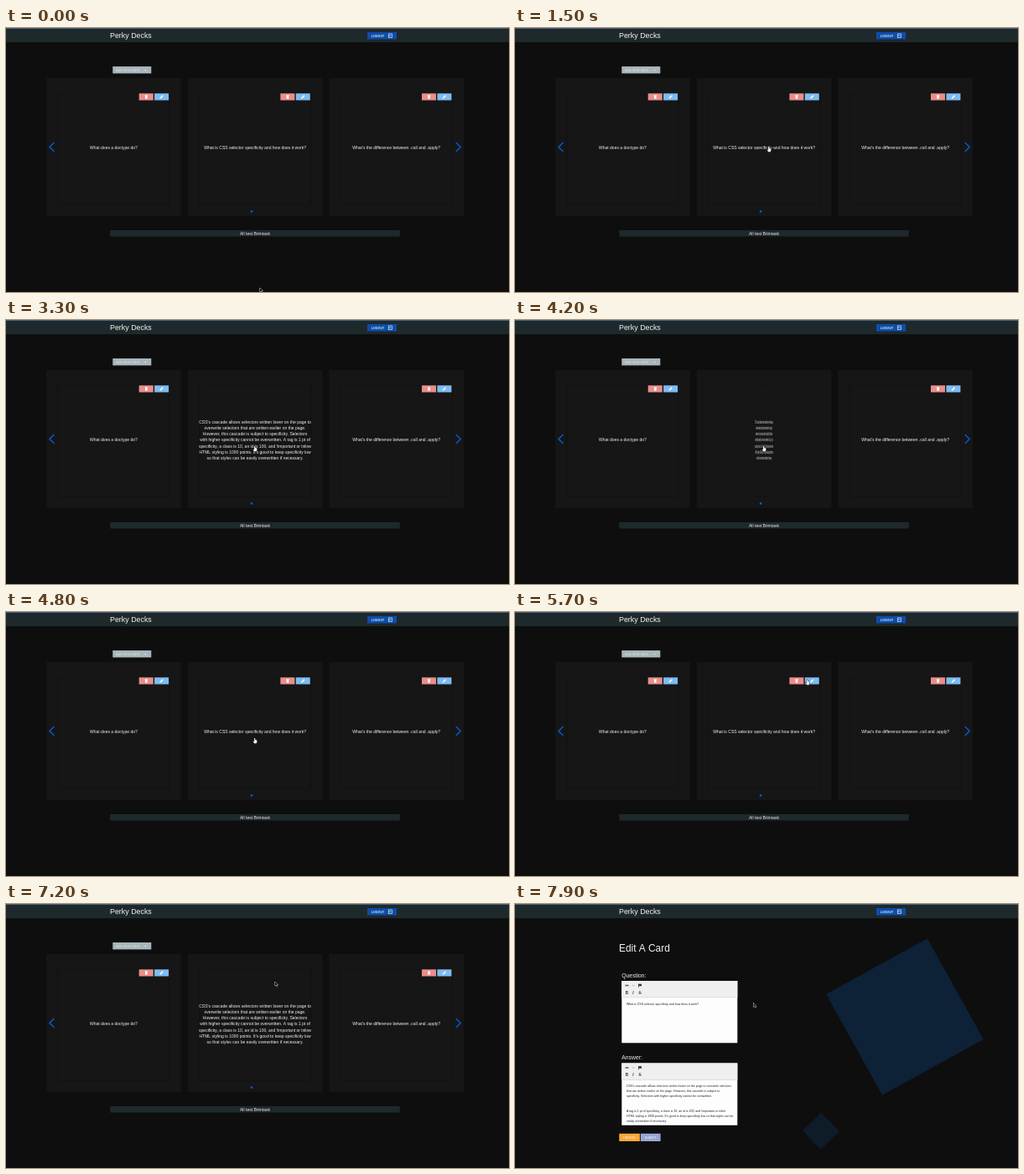
Write an HTML page with a canvas that moves like this. It is 600 px wide and 316 px high and loops after 8 s.

```html
<!DOCTYPE html>
<html lang="en">
<head>
<meta charset="utf-8">
<title>Flashcards</title>
<style>
  html, body { margin: 0; width: 100%; height: 100%; overflow: hidden; background: #0e0e0e; }
  canvas { display: block; width: 600px; height: 316px; }
</style>
</head>
<body>
<canvas id="stage" width="600" height="316"></canvas>
<script>
const ctx = document.getElementById('stage').getContext('2d');
const LOOP = 8000, EDIT_AT = 7350, FLIP_MS = 600;
const FLIPS = [2000, 4040, 6400];
const QUESTIONS = [
  'What does a doctype do?',
  'What is CSS selector specificity and how does it work?',
  "What's the difference between .call and .apply?"
];
const ANSWER = [
  "CSS's cascade allows selectors written lower on the page to",
  'overwrite selectors that are written earlier on the page.',
  'However, this cascade is subject to specificity. Selectors',
  'with higher specificity cannot be overwritten. A tag is 1 pt of',
  'specificity, a class is 10, an id is 100, and !important or inline',
  "HTML styling is 1000 points. It's good to keep specificity low",
  'so that styles can be easily overwritten if necessary.'
];
const EDIT_ANSWER = [
  "CSS's cascade allows selectors written lower on the page to overwrite selectors",
  'that are written earlier on the page. However, this cascade is subject to',
  'specificity. Selectors with higher specificity cannot be overwritten.',
  '', '',
  'A tag is 1 pt of specificity, a class is 10, an id is 100, and !important or inline',
  "HTML styling is 1000 points. It's good to keep specificity low so that styles can be",
  'easily overwritten if necessary.'
];
// time, x, y of the pointer tip
const POINTER = [
  [0, 303, 311], [100, 303, 311], [400, 306, 139], [800, 306, 139], [1400, 303, 142],
  [1800, 303, 142], [1980, 297, 151], [4850, 297, 151], [5500, 349, 81], [5700, 349, 81],
  [6100, 352, 80], [6600, 352, 80], [7100, 321, 93], [7250, 321, 93], [7850, 284.5, 118.5]
];

const clamp = v => Math.max(0, Math.min(1, v));
const smooth = v => v * v * (3 - 2 * v);

// CSS "ease": cubic-bezier(.25, .1, .25, 1)
function ease(x) {
  let lo = 0, hi = 1, u = x;
  for (let i = 0; i < 20; i++) {
    u = (lo + hi) / 2;
    const bx = .75 * u * (1 - u) + u ** 3;
    if (bx < x) lo = u; else hi = u;
  }
  return .3 * u * (1 - u) ** 2 + 3 * u * u * (1 - u) + u ** 3;
}

function rect(x, y, w, h, color) {
  ctx.fillStyle = color;
  ctx.fillRect(x, y, w, h);
}

function text(str, x, y, size, { color = '#f2f2f2', align = 'left', style = '' } = {}) {
  ctx.font = `${style} ${size}px "Liberation Sans", Arial, sans-serif`;
  ctx.textAlign = align;
  ctx.fillStyle = color;
  ctx.fillText(str, x, y);
}

function line(points, color, width) {
  ctx.beginPath();
  points.forEach(([x, y]) => ctx.lineTo(x, y));
  ctx.strokeStyle = color;
  ctx.lineWidth = width;
  ctx.stroke();
}

function shape(points, fill, stroke) {
  ctx.beginPath();
  points.forEach(([x, y]) => ctx.lineTo(x, y));
  ctx.closePath();
  ctx.lineWidth = .9;
  ctx.strokeStyle = stroke;
  ctx.stroke();
  ctx.fillStyle = fill;
  ctx.fill();
}

function header() {
  rect(0, 0, 600, 17, '#1e292c');
  rect(0, 0, 600, 1, '#46627a');
  text('Perky Decks', 124, 12, 8.9);
  rect(431, 5, 35, 8.5, '#0d4da8');
  text('LOGOUT', 435.7, 10.6, 3.65, { style: 'bold', color: '#dfe9f7' });
  ctx.strokeStyle = '#e4edf8';
  ctx.lineWidth = .7;
  ctx.strokeRect(456.3, 7, 4.2, 4.4);
  line([[456.8, 9.2], [459.2, 9.2]], '#e4edf8', .8);
}

function cardButtons(cx) {
  rect(cx + 30.3, 78.3, 17, 8.2, '#eb8e8a');
  rect(cx + 48.7, 78.3, 17, 8.2, '#7dbcf1');
  rect(cx + 37.6, 81, 2.6, 3.6, '#fff');
  rect(cx + 37, 80.4, 3.8, .6, '#fff');
  line([[cx + 55.4, 84.3], [cx + 58.8, 80.9]], '#fff', 1.5);
}

function cardFace(cx, question) {
  ctx.strokeStyle = '#121212';
  ctx.lineWidth = 1;
  ctx.strokeRect(cx - 66.5, 78.5, 133, 133);
  if (question) {
    cardButtons(cx);
    text(question, cx, 145.2, 5.03, { align: 'center' });
  } else {
    ANSWER.forEach((row, i) => text(row, cx, 123.6 + i * 7.25, 5.03, { align: 'center' }));
  }
}

function cardsPage(t) {
  rect(127.3, 46, 46, 8.4, '#a8b5ba');
  text('ADD NEW CARD', 131.3, 51.6, 3.6, { color: '#dce3e5' });
  text('+', 166.3, 52, 5, { align: 'center' });

  const turns = FLIPS.reduce((sum, at) => sum + ease(clamp((t - at) / FLIP_MS)), 0);
  const facing = Math.cos(turns * Math.PI);
  QUESTIONS.forEach((question, i) => {
    const cx = 128.4 + i * 168.65;
    rect(cx - 80.3, 60, 160.6, 165, '#161616');
    ctx.save();
    if (i === 1) {
      ctx.translate(cx, 0);
      ctx.scale(Math.max(.001, Math.abs(facing)), 1);
      ctx.translate(-cx, 0);
    }
    cardFace(cx, i === 1 && facing < 0 ? null : question);
    ctx.restore();
  });

  line([[57.5, 137], [52, 142.5], [57.5, 148]], '#0b57c0', 1.6);
  line([[536.7, 137], [542.2, 142.5], [536.7, 148]], '#0b57c0', 1.6);
  ctx.beginPath();
  ctx.arc(293, 219.6, 1.3, 0, 7);
  ctx.fillStyle = '#0b5fd0';
  ctx.fill();

  rect(124.3, 242, 345.5, 7.6, '#1e292c');
  text('All test Brimtask', 297, 247.6, 5.03, { align: 'center' });
}

function square(cx, cy, size, angle, color) {
  ctx.save();
  ctx.translate(cx, cy);
  ctx.rotate(angle);
  rect(-size / 2, -size / 2, size, size, color);
  ctx.restore();
}

function editor(y, rows, textY) {
  rect(127.3, y, 138, 74.3, '#fdfdfd');
  rect(127.3, y, 138, 20, '#efefef');
  rect(127.3, y + 19.6, 138, .6, '#cfcfcf');
  line([[131.5, y + 5.5], [135.5, y + 5.5]], '#555', 1.5);
  line([[139.7, y + 5.5], [142.7, y + 5.5]], '#c4c4c4', 1.3);
  rect(147.2, y + 3.7, 3.8, 2.5, '#333');
  rect(147.2, y + 3.7, .7, 4.2, '#333');
  const dark = { color: '#333', align: 'center' };
  text('B', 133.5, y + 15.8, 4.6, { ...dark, style: 'bold' });
  text('I', 141, y + 15.8, 4.6, { ...dark, style: 'italic bold' });
  text('S', 149, y + 15.8, 4.6, dark);
  rect(147, y + 14, 4, .5, '#333');
  rows.forEach((row, i) => text(row, 133, textY + i * 6, 3.55, { color: '#222' }));
}

function editPage(t) {
  const grow = clamp((t - EDIT_AT) / (7900 - EDIT_AT)) + Math.max(0, t - 7900) / 1500;
  square(465, 135, 138 * grow, 1.064 - (1 - grow) * 1.2, '#0d2137');
  square(365, 271.7, 31 * grow, .8 - (1 - grow) * 1.2, '#0e1c2a');

  text('Edit A Card', 124, 56.8, 11.9);
  text('Question:', 127.3, 88, 6.8);
  editor(92, [QUESTIONS[1]], 121.4);
  text('Answer:', 127.3, 186.3, 6.8);
  editor(190.5, EDIT_ANSWER, 219.4);

  rect(124.3, 274.8, 24.6, 9.2, '#f8a83a');
  text('CANCEL', 136.6, 280.7, 3.7, { align: 'center' });
  rect(149.8, 274.8, 23.8, 9.2, '#98a6d4');
  text('SUBMIT', 161.7, 280.7, 3.7, { align: 'center' });
}

function pointer(t) {
  let i = POINTER.findIndex(p => p[0] > t);
  if (i < 0) i = POINTER.length;
  const a = POINTER[i - 1], b = POINTER[i] || a;
  const k = b === a ? 0 : smooth((t - a[0]) / (b[0] - a[0]));
  const hand = t > 300 && t < 6700;
  ctx.save();
  ctx.translate(a[1] + (b[1] - a[1]) * k, a[2] + (b[2] - a[2]) * k);
  if (hand) {
    shape([[-.9, 0], [.1, 0], [.3, 2], [2.3, 2.6], [2.3, 4.8], [1.6, 6.3], [-.9, 6.3], [-2.3, 3.7], [-.9, 3.9]], '#f4f4f4', '#222');
  } else {
    shape([[0, 0], [0, 4.6], [1.1, 3.7], [2, 5.6], [2.8, 5.2], [2, 3.4], [3.3, 3.3]], '#111', '#e8e8e8');
  }
  ctx.restore();
}

function draw() {
  const t = performance.now() % LOOP;
  rect(0, 0, 600, 316, '#0e0e0e');
  header();
  if (t < EDIT_AT) cardsPage(t); else editPage(t);
  pointer(t);
  requestAnimationFrame(draw);
}
draw();
</script>
</body>
</html>
```
